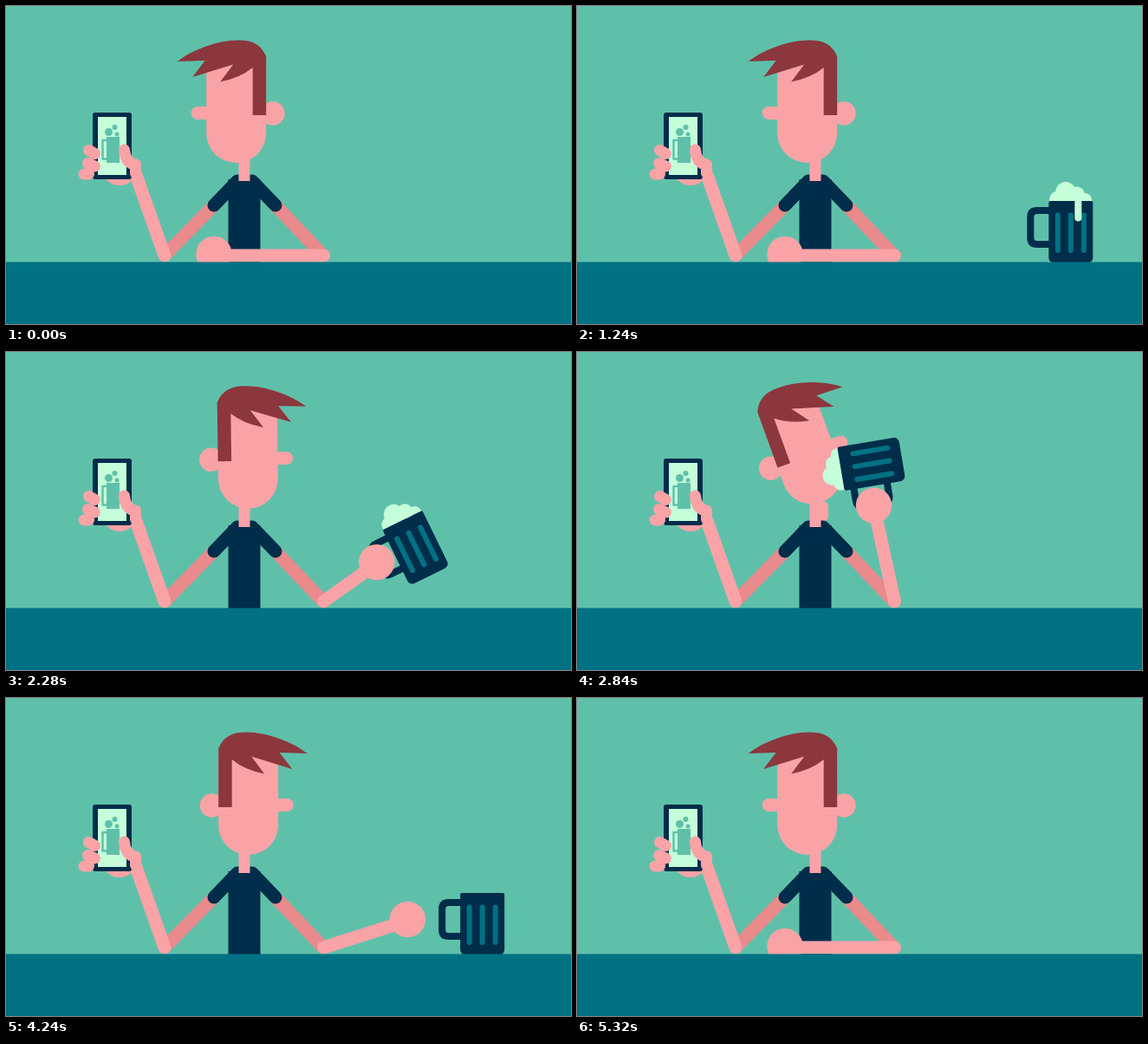
Animation, 652 px wide and 367 px high, one loop 5.4 s. Source, as an HTML page with a canvas:

```html
<!DOCTYPE html>
<html lang="en">
<head>
<meta charset="utf-8">
<title>Ordering a beer</title>
<style>
html, body { margin: 0; width: 100%; height: 100%; overflow: hidden; background: #5fc0aa; }
canvas { display: block; }
</style>
</head>
<body>
<canvas id="stage" width="652" height="367"></canvas>
<script>
const LOOP = 5400, RAD = Math.PI / 180;
const BG = '#5fc0aa', TABLE = '#007283', SKIN = '#faa3a7', SHADE = '#e98a8c',
      HAIR = '#8b373d', NAVY = '#002d4a', FOAM = '#c4ffda';
const c = document.getElementById('stage').getContext('2d');
let t = 0;

const mix = (a, b, k) => a + (b - a) * k;
const part = (from, to) => Math.min(1, Math.max(0, (t - from) / (to - from)));
const ramp = (from, to) => { const k = part(from, to); return k * k * (3 - 2 * k); };
const pulse = (a, b, d, e) => ramp(a, b) - ramp(d, e);          // up, hold, down
const hump = (from, to) => Math.sin(Math.PI * part(from, to));

function circle(x, y, r, color) {
  c.fillStyle = color;
  c.beginPath();
  c.arc(x, y, r, 0, 7);
  c.fill();
}
function box(x, y, w, h, r, color) {
  c.fillStyle = color;
  c.beginPath();
  c.roundRect(x, y, w, h, r);
  c.fill();
}
function stroke(path, w, color, cap = 'round') {
  c.lineWidth = w;
  c.lineCap = cap;
  c.lineJoin = 'round';
  c.strokeStyle = color;
  c.stroke(new Path2D(path));
}
function turn(x, y, deg) {
  c.translate(x, y);
  c.rotate(deg * RAD);
  c.translate(-x, -y);
}
function group(draw) {
  c.save();
  draw();
  c.restore();
}

function icon() {
  box(116, 151, 15, 30, 0, BG);
  stroke('M116 155H111.5V176.5H116', 2.5, BG, 'butt');
  circle(118.5, 145.5, 4.5, BG);
  circle(125.5, 140, 3, BG);
  circle(128, 148, 2.5, BG);
}

function phoneArm() {
  // A short shake that swells and dies away
  const shake = -19 * Math.exp(-(((t - 660) / 110) ** 2)) * Math.sin((t - 490) / 140 * Math.PI);
  const lag = pulse(700, 840, 840, 1060);
  group(() => {
    if (t > 440) turn(183, 288, shake);
    stroke('M183 288L150 195', 15, SKIN);
    turn(133, 200, -2 * lag);
    circle(131, 187, 20, SKIN);
    box(100, 123, 45, 77, 3, NAVY);
    box(106, 128, 33, 67, 0, FOAM);
    group(() => {
      c.translate(-3 * lag, 0);
      icon();
    });
    stroke('M95.5 166.5L102.5 170.5M94.5 181.5L102.5 185M90 194H95.5', 13, SKIN);
    stroke('M136.5 166Q138 182 149.5 183V193', 13, SKIN);
  });
}

function body() {
  stroke('M240 230L184 287M311 230L366 288', 15, SHADE);
  const gulp = pulse(2620, 2720, 3140, 3220);
  const bob = 8 * gulp * Math.sin((t - 2840) / 150 * Math.PI);
  box(269, 172 + bob, 12 + 9 * gulp, 23, 6, SKIN);
  stroke('M240 230L267 202H284L311 230', 15, NAVY);
  box(256.5, 200, 37, 97, 0, NAVY);
}

function hair(gust) {
  // Loose strands bend up more the farther out they are
  const bend = (x, y) => [x + (y - 62) * .3 * gust, y - (x - 260) * .14 * gust];
  c.fillStyle = HAIR;
  c.beginPath();
  c.moveTo(245, 126);
  c.lineTo(245, 58);
  c.bezierCurveTo(251, 44, 262, 39, 278, 39.5);
  c.bezierCurveTo(302, 40, ...bend(329, 50), ...bend(347.5, 64));
  c.lineTo(315.5, 63);
  c.lineTo(...bend(330, 82));
  c.lineTo(283, 67.5);
  c.lineTo(...bend(298, 87.5));
  c.quadraticCurveTo(275, 83, 260.5, 71);
  c.lineTo(260.5, 126);
  c.fill();
}

function head() {
  const side = 2 * pulse(1360, 1520, 4960, 5120) - 1;
  group(() => {
    turn(259.5, 168.5, -20 * pulse(2240, 2580, 3250, 3500));
    c.translate(272.7 + 7 * side, 0);
    circle(-42.2 * side, 124, 13.7, SKIN);
    box(36 * side - 16, 116, 32, 15, 7.5, SKIN);
    box(-34.5, 66, 69, 115, [0, 0, 34.5, 34.5], SKIN);
    c.scale(side < 0 ? -1 : 1, 1);
    c.translate(-279.5, 0);
    hair(hump(1400, 1900) + hump(4940, 5300));
  });
  box(268.5, 165, 13, 37, 0, SKIN);
}

function drop(from, to, x0, x1, y0, y1, rise, r) {
  const k = part(from, to);
  if (k > 0 && k < 1) circle(mix(x0, x1, k), mix(y0, y1, k) - 4 * rise * k * (1 - k), r, FOAM);
}

// Mug drawn around its centre
function mug(x, y, angle) {
  const foam = 1 - ramp(3240, 3360), drip = 1 - ramp(2120, 2320);
  group(() => {
    c.translate(x, y);
    c.rotate(angle);
    if (foam) group(() => {
      c.translate(0, -34);
      c.scale(1, foam);
      circle(-16, -4, 8.5, FOAM);
      circle(-6, -12, 11.5, FOAM);
      circle(7, -9, 9, FOAM);
      circle(16.5, -3, 7.5, FOAM);
      box(-24.5, -4, 48.5, 6, 0, FOAM);
    });
    stroke('M-23 -24.5H-39Q-46.5 -24.5 -46.5 -17V7Q-46.5 14.5 -39 14.5H-23', 8, NAVY);
    box(-25.5, -35.5, 51, 71.5, [2, 2, 6, 6], NAVY);
    for (const bar of [-15, 0, 15]) box(bar - 3, -22, 6, 46.5, 3, TABLE);
    if (drip) box(4.5, -38, 8, 26 * drip, 4, FOAM);
  });
}

function drinkingArm() {
  const lift = pulse(2120, 2600, 3230, 3480);
  const slideIn = 190 * (1 - part(1060, 1560)) ** 3;
  const pushOff = 1.27 * Math.max(0, t - 4218);
  const pull = -20 * pulse(3800, 4080, 4080, 4218);
  const x = mix(520.5, 339.5, lift) + pull;
  const y = mix(260.5, 129, lift) - 4.6 * hump(3480, 3760);
  const angle = -99.5 * RAD * lift;

  // Where the hand holds the handle, seen from the elbow
  const grip = 1 - ramp(3500, 3640);
  const gx = mix(-57, -48, grip), gy = -5;
  const cos = Math.cos(angle), sin = Math.sin(angle);
  const dx = x + gx * cos - gy * sin - 366, dy = y + gx * sin + gy * cos - 288;

  const reach = pulse(1680, 2080, 4930, 5310);
  const a = mix(-Math.PI + .012, Math.atan2(dy, dx), reach);
  const r = mix(126, Math.hypot(dx, dy), reach);
  const hx = 366 + r * Math.cos(a), hy = 288 + r * Math.sin(a);

  if (t > 1000 && t < 4400) mug(x + slideIn + pushOff, y, angle);
  stroke(`M366.5 288L${hx} ${hy + 1.5}`, 15, SKIN);
  circle(hx, hy, 20.7, SKIN);
}

function draw() {
  c.fillStyle = BG;
  c.fillRect(0, 0, 652, 367);
  body();
  head();
  phoneArm();
  drop(2420, 2690, 500, 479, 222, 256, 16, 2.5);
  drop(3480, 3760, 496, 471.5, 225, 225, 14.3, 2.5);
  drop(3480, 3760, 545, 568.5, 225, 225, 19.4, 4);
  drinkingArm();
  c.fillStyle = TABLE;
  c.fillRect(0, 295.5, 652, 72);
}

const start = performance.now();
function tick(now) {
  t = Math.max(0, now - start) % LOOP;
  draw();
  requestAnimationFrame(tick);
}
draw();
requestAnimationFrame(tick);
</script>
</body>
</html>
```
